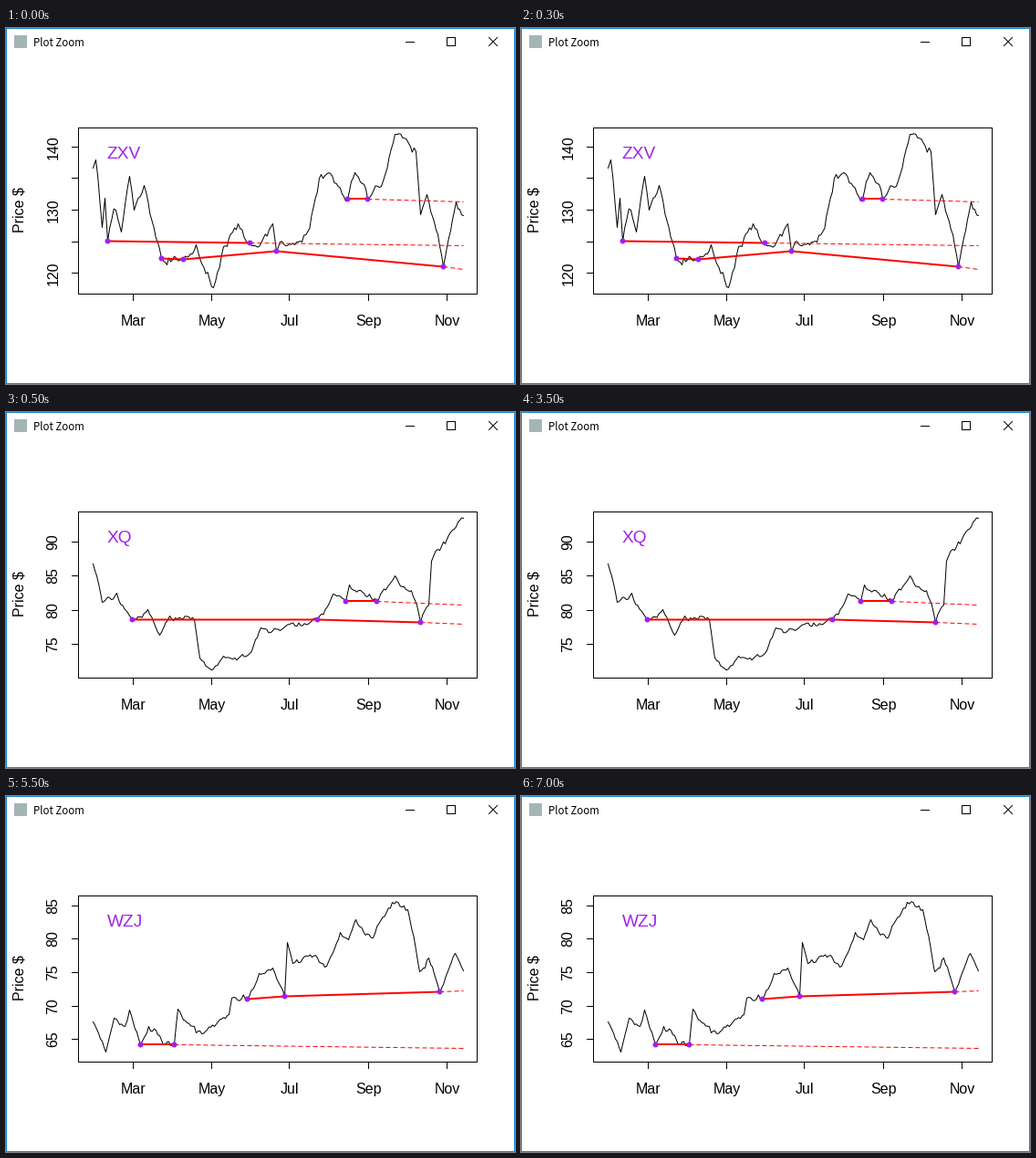
These frames come from a looping animation (558x390 px, 8 s). A matplotlib script:

```python
import numpy as np
import matplotlib.pyplot as plt
from matplotlib.animation import FuncAnimation
from matplotlib.patches import Rectangle

W, H, DPI = 558, 390, 100
PX = 72 / DPI  # points per pixel
STEP = 500
BLUE, RED, PURPLE = "#1883d7", "#ff0000", "#a020f0"
DAY = 2.03  # pixels per trading day
LAST_X = 501

fig = plt.figure(figsize=(W / DPI, H / DPI), dpi=DPI, facecolor="white")
ax = fig.add_axes([0, 0, 1, 1])
# whole numbers land on pixel centres, just below the rounding limit
ax.set_xlim(-0.49, W - 0.49)
ax.set_ylim(H - 0.49, -0.49)
ax.axis("off")


def line(pts, color="black", width=1, **kw):
    x, y = zip(*pts)
    return ax.plot(x, y, color=color, lw=width * PX,
                   solid_joinstyle="round", **kw)[0]


def box(x0, y0, x1, y1, color="black"):
    return line([(x0, y0), (x1, y0), (x1, y1), (x0, y1), (x0, y0)], color,
                solid_capstyle="projecting")


def text(x, y, s, size=16, color="black", font="Liberation Sans", **kw):
    return ax.text(x, y, s, fontsize=size * PX, color=color, family=font,
                   va="baseline", rotation_mode="anchor", **kw)


def random_walk(turns, vol, seed):
    """Daily prices: a random walk pinned to each turning point."""
    rng = np.random.default_rng(seed)
    path = [turns[0]]
    for (x0, y0), (x1, y1) in zip(turns, turns[1:]):
        n = max(1, round((x1 - x0) / DAY))
        t = np.arange(1, n + 1) / n
        walk = np.cumsum(rng.normal(0, vol, n))
        y = y0 + (y1 - y0) * t + walk - walk[-1] * t
        path += zip(x0 + (x1 - x0) * t, y)
    return path


def chart(name, top, y_top, gap, count, label_every, turns, vol, supports, seed):
    """One stock: y ticks every 5 dollars, prices and support lines."""
    parts = [text(110, 143, name, 19.2, PURPLE)]
    for k in range(count):
        y = round(y_top + gap * k)
        parts.append(line([(72, y), (79, y)]))
        if k % label_every == 0:
            parts.append(text(56, y, str(top - 5 * k), rotation=90, ha="center"))
    parts.append(line(random_walk(turns, vol, seed)))
    for pts, end in supports:
        parts.append(line([pts[-1], (LAST_X, end)], RED, ls=(0, (5, 3))))
        parts.append(line(pts, RED, 2))
    for pts, _ in supports:
        parts.append(line(pts, PURPLE, 0, ls="none", marker="o",
                          ms=6 * PX, mew=0))
    return parts


# window
box(0, 0, W - 1, H - 1, BLUE)
ax.add_patch(Rectangle((9, 8), 14, 14, color="#a3b5b5", lw=0))
text(30, 20, "Plot Zoom", 11.5, font="Noto Sans CJK JP")
line([(438, 15), (447, 15)], solid_capstyle="projecting")
box(483, 10, 492, 19)
line([(529, 10), (538, 19)])
line([(529, 19), (538, 10)])

# plot area
box(79, 109, 516, 291)
text(19, 199, "Price $", rotation=90, ha="center")
month_x = 139 + 1.404 * np.cumsum([0, 61, 61, 62, 61])
for x, month in zip(month_x.round(), ("Mar", "May", "Jul", "Sep", "Nov")):
    line([(x, 291), (x, 298)])
    text(x, 326, month, ha="center")

first = chart(
    "ZXV", 140, 130, 34.5, 5, 2,
    [(95, 153), (98, 144), (105, 218), (108, 186), (111, 233), (120, 199),
     (126, 223), (135, 162), (140, 199), (151, 172), (170, 252), (194, 253),
     (208, 237), (227, 284), (238, 239), (254, 214), (267, 235), (292, 214),
     (296, 244), (324, 234), (345, 160), (374, 187), (382, 158), (396, 187),
     (411, 173), (426, 116), (449, 135), (454, 204), (461, 182), (479, 261),
     (493, 190), (501, 205)], 3,
    [([(111, 233), (267, 235)], 238),
     ([(170, 252), (194, 253), (296, 244), (479, 261)], 264),
     ([(374, 187), (396, 187)], 190)],
    3)

second = chart(
    "XQ", 90, 142, 37.3, 4, 1,
    [(95, 166), (105, 208), (121, 198), (138, 227), (155, 216), (168, 244),
     (179, 223), (206, 227), (212, 269), (227, 281), (238, 267), (267, 264),
     (279, 236), (300, 239), (341, 227), (358, 199), (372, 207), (376, 189),
     (406, 207), (426, 179), (448, 206), (454, 230), (463, 211), (466, 163),
     (473, 150), (501, 116)], 2,
    [([(138, 227), (341, 227), (454, 230)], 232),
     ([(372, 207), (406, 207)], 211)],
    5)

third = chart(
    "WZJ", 85, 120, 36.5, 5, 1,
    [(95, 247), (109, 280), (118, 243), (130, 252), (135, 234), (147, 272),
     (156, 252), (184, 272), (188, 233), (208, 259), (244, 239), (247, 221),
     (264, 222), (277, 194), (292, 188), (305, 219), (308, 160), (314, 183),
     (331, 175), (351, 186), (366, 149), (375, 157), (383, 135), (402, 155),
     (423, 116), (440, 124), (453, 192), (463, 177), (475, 214), (492, 172),
     (501, 191)], 2,
    [([(147, 272), (184, 272)], 276),
     ([(264, 222), (305, 219), (475, 214)], 213)],
    8)

SCHEDULE = [(0, first), (500, second), (5500, third)]


def update(i):
    now = i * STEP
    current = [c for start, c in SCHEDULE if start <= now][-1]
    for _, c in SCHEDULE:
        for part in c:
            part.set_visible(c is current)
    return []


anim = FuncAnimation(fig, update, frames=8000 // STEP, interval=STEP,
                     repeat=True, repeat_delay=0, blit=False)
plt.show()
```
